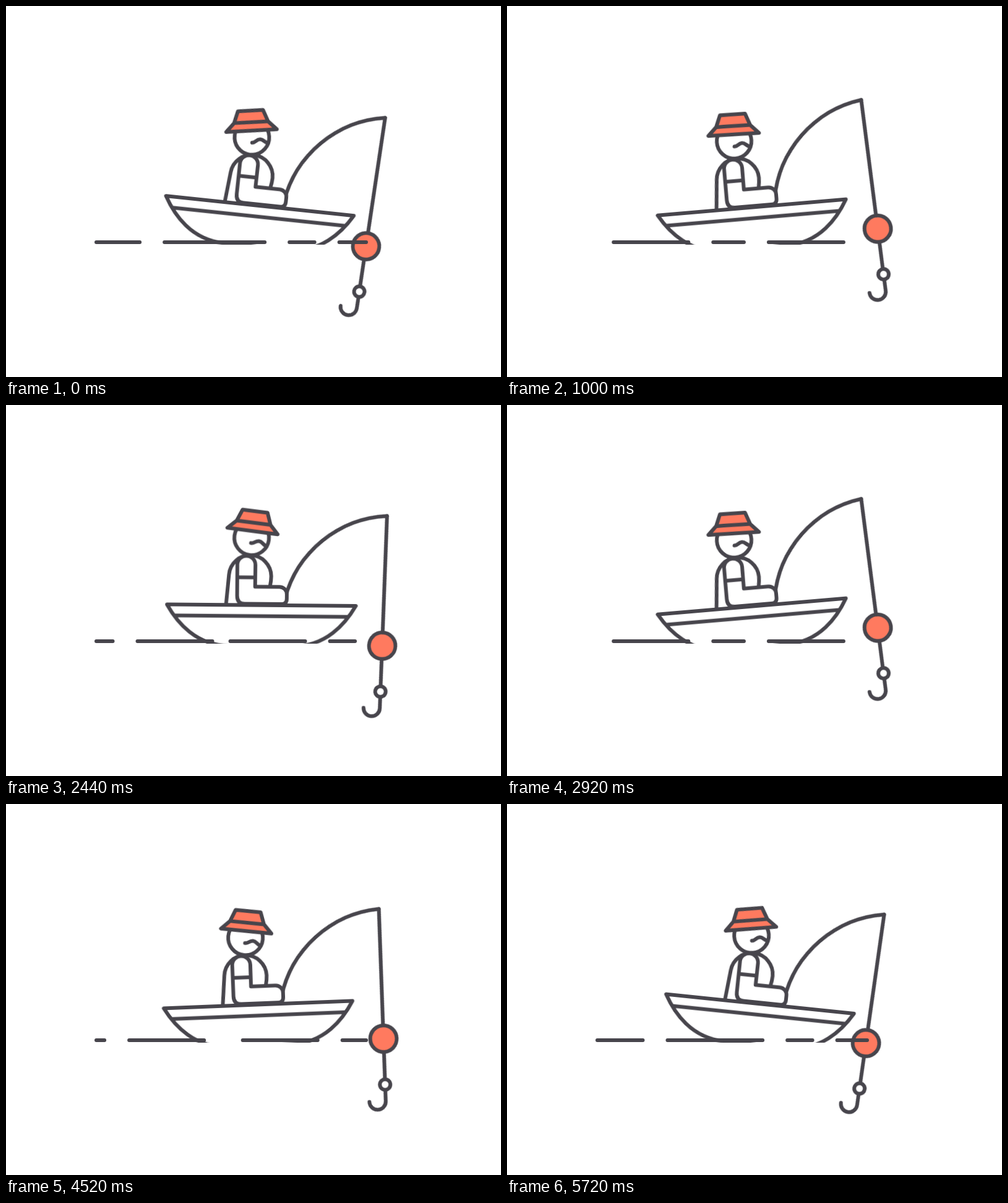
Recreate the animation shown at these times as an HTML page. Size 800x600 px, loop 5760 ms.

```html
<!DOCTYPE html>
<html lang="en">
<head>
<meta charset="utf-8">
<title>Fishing boat</title>
<style>
  html, body { margin: 0; width: 100%; height: 100%; overflow: hidden; background: #fff; }
  svg { display: block; width: 800px; height: 600px; }
  svg * { transform-origin: 0 0; }

  .ink { fill: none; stroke: #47454c; stroke-width: 6; stroke-linecap: round; stroke-linejoin: round; }
  .paper { fill: #fff; }
  .coral { fill: #ff7a5f; }

  /* Every swing is a sine: half a period between two extremes, shifted by its delay. */
  .boat, .swing {
    animation-duration: 960ms;
    animation-timing-function: cubic-bezier(.364, 0, .636, 1);
    animation-iteration-count: infinite;
    animation-direction: alternate;
  }
  .boat {
    --hi: 6.06deg; --lo: -4.9deg;
    animation-name: drift, swing, bob;
    animation-delay: -1618ms, -1885ms, -779ms;
  }
  .swing { animation-name: swing; }
  .rod  { translate: 37.9px -10px;   --hi: -39.6deg; --lo: -49.6deg;  animation-delay: -1364ms; }
  .line { translate: 213px 0;        --hi: 49.35deg; --lo: 40.11deg;  animation-delay: -214ms; }
  .head { translate: -20px -80.5px;  --hi: 7.91deg;  --lo: -14.31deg; animation-delay: -1269ms; }

  @keyframes swing { from { rotate: var(--hi); } to { rotate: var(--lo); } }
  @keyframes drift { from { translate: 415.7px 324.3px; } to { translate: 391.3px 324.3px; } }
  @keyframes bob { from { transform: translateY(1.5px); } to { transform: translateY(-1.4px); } }

  /* Two waterlines flow apart, one full dash pattern per period. */
  .water { animation: flow 1920ms linear infinite; }
  .left  { stroke-dasharray: 121 40;         --a: -110.2px; --b: 50.8px; }
  .right { stroke-dasharray: 121 40 40.5 40; --a: 55px;     --b: -186.5px; }
  @keyframes flow { from { stroke-dashoffset: var(--a); } to { stroke-dashoffset: var(--b); } }
</style>
</head>
<body>
<svg viewBox="0 0 800 600">
  <clipPath id="above"><rect width="800" height="385.5"/></clipPath>

  <g class="ink">
    <g class="boat">
      <g class="swing rod">
        <path d="M0 0A180 180 0 0 1 213 0"/>
        <g class="swing line">
          <path d="M0 0V276M0 292V311.3A13.2 13.2 0 0 1 -26.4 311.3"/>
          <circle class="coral" cy="210" r="21.4"/>
          <circle class="paper" cy="284.2" r="8.5"/>
        </g>
      </g>
    </g>

    <g clip-path="url(#above)">
      <g class="boat">
        <path class="paper" d="M-57 -2L-52.7 -49A34.2 34.2 0 0 1 15.6 -47Q15.6 -40 13.8 -31"/>
        <g class="swing head">
          <g transform="translate(0 -28.5)">
            <circle class="paper" r="28"/>
            <path d="M0 8.5C5 9 7 3.8 12.5 3.8C17.5 3.8 18.5 7.5 24 10"/>
            <path class="coral" d="M-27.5 -24.6L-41 -11H41L27.5 -24.6L20.3 -43.4H-20.3ZH27.5"/>
          </g>
        </g>
        <path class="paper" d="M-39.3 -65A14.6 14.6 0 0 1 -10.1 -65L-10.3 -29.8H29A12 12 0 0 1 41 -17.8V-11Q41 -2 33 -2H-27Q-39.3 -2 -39.3 -15ZM-39 -44.7H-10.3"/>
        <path class="paper" d="M-152.6 0H152.6C136 29 105 66 52 66H-52C-105 66 -136 29 -152.6 0ZM-140.5 17.7H140.5"/>
      </g>
    </g>

    <path class="water left" d="M146 382H352"/>
    <path class="water right" d="M352 382H582"/>
  </g>
</svg>
</body>
</html>
```
